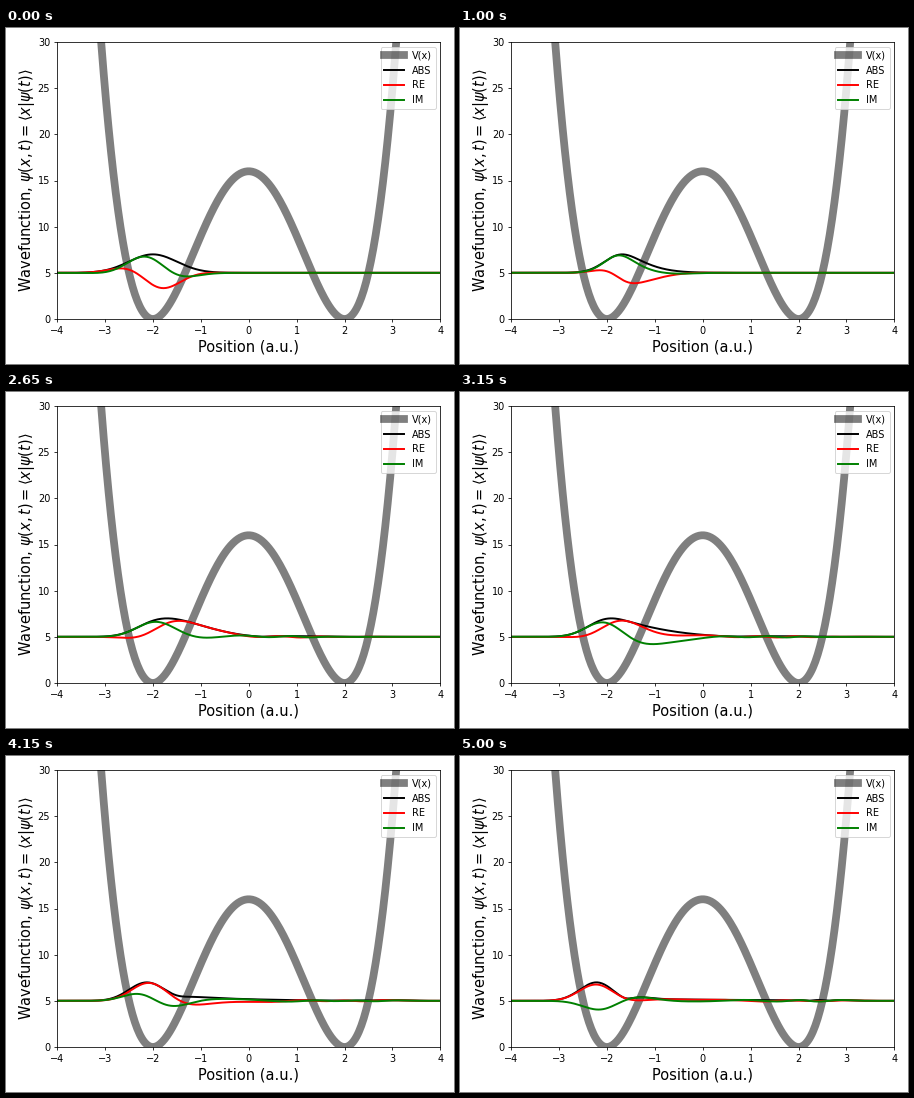
Write a matplotlib script that moves like this. It is 448x336 px and loops after 5050 ms.

```python
import numpy as np
import matplotlib.pyplot as plt
from matplotlib.animation import FuncAnimation

W, H, DPI = 448, 336, 70
LEFT, RIGHT, TOP, BOTTOM = 51, 434.4, 14, 291  # axes box in pixels
FRAMES, INTERVAL = 101, 50
DT = 0.01           # model time per frame
X0, P0 = -2.0, 2.0  # start position and momentum
BASE, PEAK = 5.0, 2.0

# Grid Hamiltonian (sinc basis, unit mass) for the double well
x = np.linspace(-5, 5, 401)
dx = x[1] - x[0]
V = (x**2 - 4)**2
n = np.arange(x.size)
d = n[:, None] - n[None, :]
T = np.where(d == 0, np.pi**2 / 6, (-1.0)**d / np.where(d == 0, 1, d)**2) / dx**2
energy, states = np.linalg.eigh(T + np.diag(V))

psi0 = np.exp(-2 * (x - X0)**2 + 1j * P0 * x)
coef = states.T @ psi0


def wave(t):
    """Wave packet at time t, scaled to a fixed peak height."""
    psi = states @ (coef * np.exp(-1j * energy * t))
    return PEAK * psi / np.abs(psi).max()


fig, ax = plt.subplots(figsize=(W / DPI, H / DPI), dpi=DPI)
fig.subplots_adjust(left=LEFT / W, right=RIGHT / W,
                    top=1 - TOP / H, bottom=1 - BOTTOM / H)
ax.plot(x, V, color="black", lw=8, alpha=0.5, label="V(x)")
parts = [("ABS", "black", np.abs), ("RE", "red", np.real), ("IM", "green", np.imag)]
lines = [ax.plot(x, BASE + f(wave(0)), color=c, lw=2, label=name)[0]
         for name, c, f in parts]

ax.set_xlim(-4, 4)
ax.set_ylim(0, 30)
ax.set_xlabel("Position (a.u.)", fontsize=15)
ax.set_ylabel(r"Wavefunction, $\psi(x,t)=\langle x|\psi(t)\rangle$",
              fontsize=15, labelpad=0.6)
ax.legend(loc="upper right")


def update(i):
    psi = wave(i * DT)
    for line, (_, _, f) in zip(lines, parts):
        line.set_ydata(BASE + f(psi))
    return lines


anim = FuncAnimation(fig, update, frames=FRAMES, interval=INTERVAL,
                     repeat=True, repeat_delay=0)
plt.show()
```
